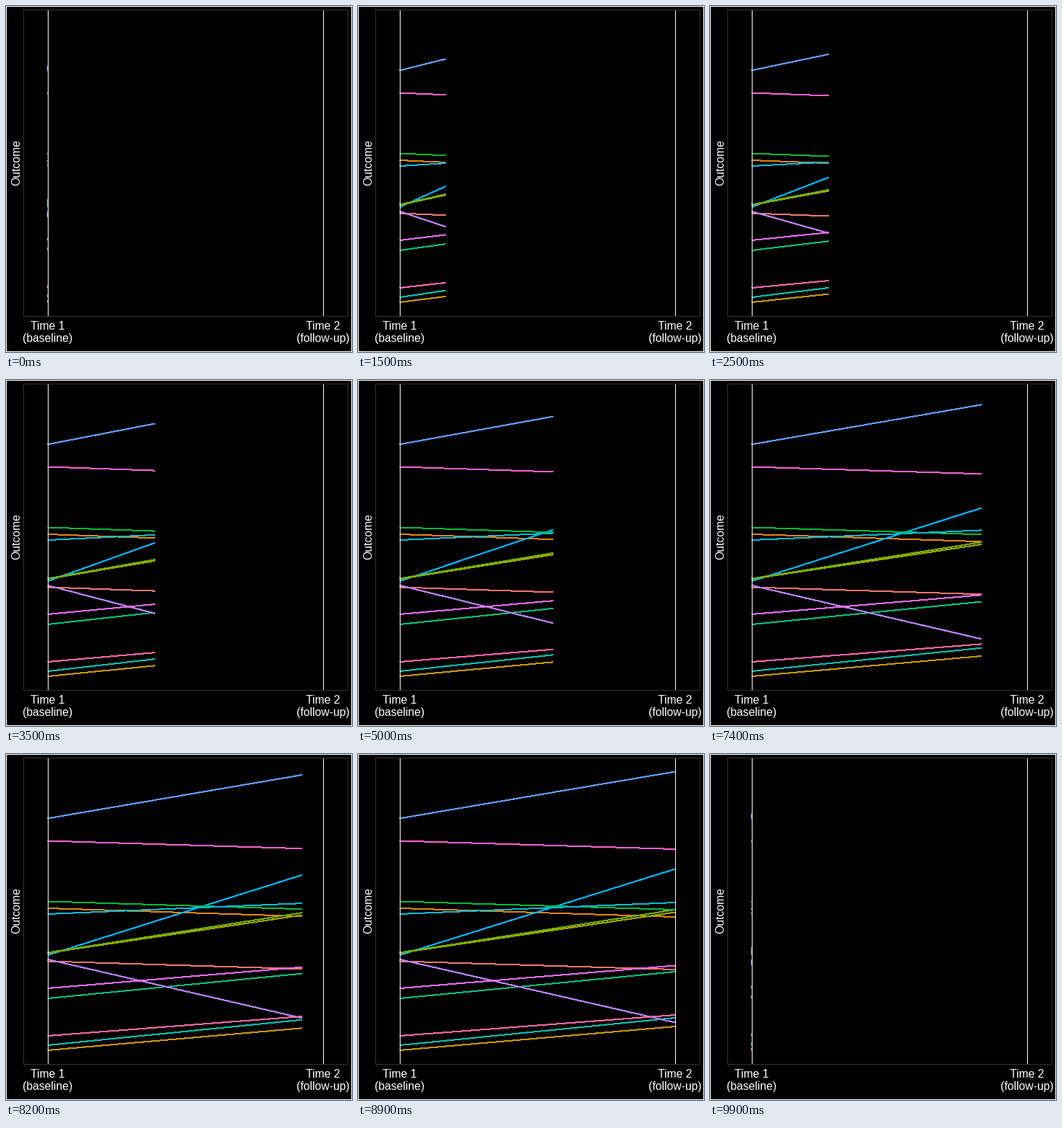
A matplotlib script that plays this animation: 480 by 480 pixels, repeating every 10000 ms.

```python
import matplotlib.pyplot as plt
from matplotlib.animation import FuncAnimation
from matplotlib.patches import Rectangle

SIZE, DPI = 480, 80
PX = 72 / DPI               # points per pixel
FRAMES, STEP_MS = 100, 100
X0, X1 = 58, 440            # baseline and follow-up axes
STATES = 11                 # key poses, about nine frames apart
FULL = 89                   # frame at which every line is complete

# (baseline y, follow-up y, colour)
SUBJECTS = [
    (287.5, 299, "#F8766D"),
    (214, 226, "#E58700"),
    (411, 378, "#C99800"),
    (279, 159.5, "#00B0F6"),
    (276, 219.5, "#A3A500"),
    (275.5, 216, "#6BB100"),
    (204.5, 216, "#00BA38"),
    (339, 302, "#00BF7D"),
    (404, 366, "#00C0AF"),
    (222, 206, "#00BCD8"),
    (89.3, 24.5, "#619CFF"),
    (285, 372.5, "#B983FF"),
    (325, 293.5, "#E76BF3"),
    (120.5, 132, "#FD61D1"),
    (391, 362, "#FF67A4"),
]

# One-pixel strokes without smoothing or snapping
CRISP = dict(lw=PX, antialiased=False, snap=False)

plt.rcParams["font.family"] = "Liberation Sans"
fig = plt.figure(figsize=(SIZE / DPI, SIZE / DPI), dpi=DPI, facecolor="black")
ax = fig.add_axes([0, 0, 1, 1])
ax.set_xlim(0, SIZE)
ax.set_ylim(SIZE, 0)
ax.axis("off")


def frame(left, top, right, bottom, color):
    ax.add_patch(Rectangle((left + 0.5, top + 0.5), right - left, bottom - top,
                           fill=False, ec=color, zorder=1, **CRISP))


def label(x, y, text, **kw):
    ax.text(x, y, text, color="white", fontsize=15.8 * PX, ha="center", **kw)


frame(0, 0, SIZE - 1, SIZE - 1, "white")
frame(24, 5, 474, 430, "#333333")
for x, name, note in [(X0, "Time 1", "(baseline)"), (X1, "Time 2", "(follow-up)")]:
    ax.plot([x + 0.5] * 2, [6, 430], color="white", zorder=3,
            solid_capstyle="butt", **CRISP)
    label(x - 0.2, 449, name, va="baseline")
    label(x - 0.2, 466, note, va="baseline")
label(14.5, 217, "Outcome", rotation=90, va="center")

# Unsmoothed slanted strokes fill every touched pixel, so these look 2 px wide
lines = [ax.plot([], [], color=c, zorder=2, solid_capstyle="butt", **CRISP)[0]
         for _, _, c in SUBJECTS]


def progress(i):
    """Share of the horizontal way covered: slow growth, quick return."""
    if i >= FULL:
        return 1 - (i - FULL) / (FRAMES - 1 - FULL)
    return (i if i <= 50 else i + 1) / 90


def update(i):
    p = progress(i)
    q = (1 + (STATES - 1) * p) / STATES   # height leads by one state
    for line, (y0, y1, _) in zip(lines, SUBJECTS):
        line.set_data([X0, X0 + (X1 - X0) * p], [y0, y0 + (y1 - y0) * q])
    return lines


anim = FuncAnimation(fig, update, frames=FRAMES, interval=STEP_MS,
                     init_func=lambda: update(0), repeat=True, repeat_delay=0)
plt.show()
```
